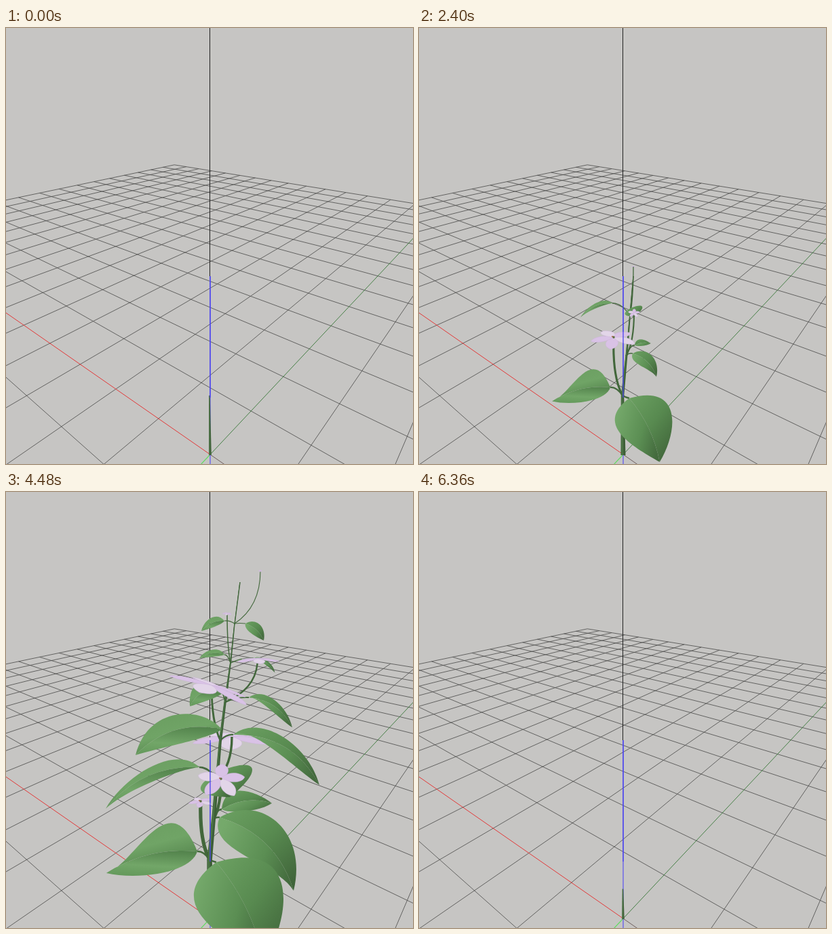
These frames come from a looping animation (600 by 643 pixels, 6440 ms). An HTML page:

```html
<!DOCTYPE html>
<html lang="en">
<head>
<meta charset="utf-8">
<title>Growing plant</title>
<style>
html, body { margin: 0; width: 100%; height: 100%; overflow: hidden; background: #c6c5c3; }
svg { display: block; width: 600px; height: 643px; }
</style>
</head>
<body>
<svg viewBox="0 0 600 643" width="600" height="643">
  <defs>
    <linearGradient id="g0" x1=".1" y1="0" x2=".6" y2="1"><stop offset="0" stop-color="#6a9d60"/><stop offset=".5" stop-color="#70a466"/><stop offset="1" stop-color="#4f7e48"/></linearGradient>
    <linearGradient id="g1" x1=".6" y1="0" x2=".4" y2="1"><stop offset="0" stop-color="#54844d"/><stop offset=".6" stop-color="#72a668"/><stop offset="1" stop-color="#659a5c"/></linearGradient>
    <linearGradient id="g2" x1="0" y1="0" x2=".9" y2="1"><stop offset="0" stop-color="#6ca162"/><stop offset=".5" stop-color="#588a50"/><stop offset="1" stop-color="#3f6339"/></linearGradient>
    <linearGradient id="g3" x1="0" y1=".3" x2="1" y2=".7"><stop offset="0" stop-color="#75a96b"/><stop offset=".6" stop-color="#5b8e53"/><stop offset="1" stop-color="#446b3e"/></linearGradient>
  </defs>
  <g id="floor" fill="none"></g>
  <g id="plant"></g>
  <path d="M301 366V545" stroke="#4a43ee" stroke-width="1.3"/>
</svg>
<script>
const LOOP = 6440, RESET = 6280;
const clamp = (v, a = 0, b = 1) => Math.max(a, Math.min(b, v));
const mix = (a, b, k) => a + (b - a) * k;
const n1 = v => v.toFixed(1);
const pt = p => n1(p[0]) + ' ' + n1(p[1]);

// Ground plane in two-point perspective.
function ground(x, y) {
  const a = x * .1075, b = y * .1333, w = 1 + a + b;
  return [(301 - 485 * a + 813 * b) / w, (629 + 83.5 * (a + b)) / w];
}

function drawFloor() {
  const near = (k, other, own) => Math.max(-15, (-.9 - k * own) / other);
  const line = (p, q, color, w = .8) =>
    `<path d="M${pt(p)}L${pt(q)}" stroke="${color}" stroke-width="${w}"/>`;
  let out = '';
  for (let k = -15; k <= 15; k++) {
    if (!k) continue;
    const x0 = near(k, .1075, .1333), y0 = near(k, .1333, .1075);
    if (x0 < 15) out += line(ground(x0, k), ground(15, k), '#4a4a48');
    if (y0 < 15) out += line(ground(k, y0), ground(k, 15), '#4a4a48');
  }
  const o = ground(0, 0);
  out += line(o, ground(-4, 0), '#5a4444') + line(o, ground(0, -3), '#62dc62', 1.2);
  out += line(o, ground(15, 0), '#e23a3a', 1) + line(o, ground(0, 15), '#387838', .9);
  out += line([300.5, 0], [300.5, 366], '#222', 1) + line([301, 366], [301, 643], '#5a52f0', 1.2);
  document.getElementById('floor').innerHTML = out;
}

// Growth clock: real time minus the pauses.
const PAUSES = [[0, 80], [2000, 2280], [2400, 2520], [4000, 4160], [6160, 6200]];
const clock = t => PAUSES.reduce((s, [a, b]) => s - clamp(t - a, 0, b - a), t);

const KEYS = [840, 2400, 3240, 4480, 5840, 6240].map(clock);
const NODES = [[301, 629], [300, 542], [306, 482], [311, 424], [316, 366], [323, 310],
  [331, 252], [337, 194], [345, 133], [352, 77], [359, 20]];
const BIRTH = [-160, 150, 1000, 1700, 2560, 2950, 3700, 4250, 5100, 5900].map(clock);

// Sizes at the last keys of the timeline, per node.
const LEAF_SIZE = [[], [.31, .64, 1, 1, .98, .98], [.32, 1, 1, 1, 1], [.34, .6, 1, 1, 1],
  [.28, 1, 1, 1], [.38, .66, 1, 1.1], [.5, 1, 1.2], [1, 1, 1.5], [1, 1.1]];
const BLOOM = [[], [3, 34, 78, 18, 0, 0], [9, 82, 36, 18, 12], [2.5, 14, 60, 14, 8],
  [7, 62, 62, 55], [2.5, 32, 62, 62], [7, 18, 30], [2.5, 9, 16], [3, 6]];

// node, base, tip, heights of the upper and lower edge relative to length
const BACK_LEAVES = [
  [8, 328, 131, 300, 153, .4, .4, -.3, -.2],
  [8, 345, 121, 346, 135, 1.8, 1.3, -1.8, -1.3],
  [7, 322, 190, 288, 205, .45, .4, -.1, -.05],
  [7, 353, 194, 380, 219, .45, .5, -.25, -.1],
  [6, 322, 240, 248, 250, .36, .34, -.05, 0],
  [6, 365, 245, 428, 288, .27, .3, .08, .06],
  [5, 318, 297, 247, 326, .4, .9, -.08, -.02],
  [5, 358, 303, 455, 370, .35, .28, .12, 0],
  [4, 335, 358, 462, 432, .32, .3, .18, .02],
  [2, 318, 468, 392, 459, .55, .3, -.1, -.15],
  [3, 312, 413, 330, 450, 1.7, 1.4, -1.5, -.6],
  [4, 318, 350, 191, 388, .3, .5, -.06, 0],
  [3, 285, 406, 147, 467, .3, .22, .05, .1]
];
const FRONT_LEAVES = [
  [1, 282, 530, 148, 562, .82, 0, -.21, -.15],
  [2, 315, 480, 424, 588, .45, .5, -.32, .08],
  [1, 310, 546, 380, 693, .75, .45, -.65, -.2]
];
// young place, mature place, flatness, slope, turn
const FLOWERS = [[],
  [274, 457, 287, 456, .42, 0, 170],
  [317, 415, 317, 423, .7, 0, -15],
  [316, 352, 333, 361, .22, 0, 20],
  [311, 283, 303, 285, .17, .33, 35],
  [368, 243, 371, 246, .13, 0, 10],
  [326, 179, 322, 182, .3, .05, 30],
  [375, 116, 365, 106, .6, 0, 20],
  [312, 70, 312, 67, .6, 0, 50]
];

function valueAt(list, birth, t) {
  let px = birth, py = 0;
  const start = KEYS.length - list.length;
  for (let i = 0; i < list.length; i++) {
    const x = KEYS[start + i];
    if (t <= x) return mix(py, list[i], clamp((t - px) / (x - px)));
    px = x; py = list[i];
  }
  return py;
}

function leaf([node, bx, by, tx, ty, u, u2, l, l2], t) {
  const s = valueAt(LEAF_SIZE[node], BIRTH[node], t);
  if (t <= BIRTH[node] || s < .01) return '';
  const vx = (tx - bx) * s, vy = (ty - by) * s, side = vx > 0 ? 1 : -1;
  const at = (a, h) => pt([bx + vx * a + vy * h * side, by + vy * a - vx * h * side]);
  const rib = at(.5, .375 * (u + u2 + l + l2));
  const half = (a, b, id) =>
    `<path d="M${at(0, 0)}C${at(.12, a)} ${at(.7, b)} ${at(1, 0)}Q${rib} ${at(0, 0)}" fill="url(#g${id})"/>`;
  const g = side > 0 ? 2 : 0;
  return half(u, u2, g) + half(l, l2, g + 1);
}

function place(i, t) {
  const [x, y, mx, my] = FLOWERS[i], k = clamp((t - BIRTH[i] - 700) / 700);
  return [mix(x, mx, k), mix(y, my, k)];
}

function flower(i, t) {
  const R = valueAt(BLOOM[i], BIRTH[i], t);
  if (t < BIRTH[i] + 150 || R < .5) return '';
  const [, , , , flat, slope, turn] = FLOWERS[i], c = place(i, t);
  const at = (r, a) => {
    const x = r * R * Math.cos(a), y = r * R * Math.sin(a);
    return pt([c[0] + x, c[1] + y * flat + x * slope + .16 * R * r * (r - .35)]);
  };
  let out = '';
  for (const j of [4, 3, 0, 2, 1]) {
    const a = (turn + j * 72) * Math.PI / 180;
    out += `<path d="M${pt(c)}C${at(.5, a - .85)} ${at(.9, a - .38)} ${at(1, a)}C${at(.9, a + .38)} ${at(.5, a + .85)} ${pt(c)}" `
      + `fill="${j % 2 ? '#e2d5e8' : '#d9c2e6'}" stroke="#ccb5da" stroke-width=".5"/>`;
  }
  if (R > 15 && flat > .4) {
    out += `<circle cx="${n1(c[0])}" cy="${n1(c[1])}" r="1.7" fill="#5b6b3a"/>`
      + `<circle cx="${n1(c[0] - 2)}" cy="${n1(c[1] - 1)}" r=".9" fill="#a5573a"/>`;
  }
  return out;
}

const girth = (i, t) => i ? clamp(1 + (t - BIRTH[i]) / 580, 1, 8.5) : clamp(3.6 + t / 600, 2.5, 9);

function stem(t) {
  let out = '';
  BIRTH.forEach((b, i) => {
    if (t < b) return;
    const p = NODES[i], q = NODES[i + 1], k = clamp((t - b) / (i ? 230 : 160), .05);
    const e = [mix(p[0], q[0], k), mix(p[1], q[1], k)];
    const w = girth(i, t) / 2, v = i < 9 && t > BIRTH[i + 1] ? girth(i + 1, t) / 2 : .7;
    const band = (a, c, color) => `<path d="M${pt([p[0] + a * w, p[1] + 1])}L${pt([e[0] + a * v, e[1]])}`
      + `L${pt([e[0] + c * v, e[1]])}L${pt([p[0] + c * w, p[1] + 1])}Z" fill="${color}"/>`;
    out += band(-1, 1, '#3d5e37') + band(-.8, .1, '#4b7344');
  });
  return out;
}

function stalk(i, t) {
  const age = t - BIRTH[i];
  if (age <= 0) return '';
  const k = clamp(age / 200), o = NODES[i], c = place(i, t), e = [mix(o[0], c[0], k), mix(o[1], c[1], k)];
  const bend = [e[0] - (i == 1 ? 2 : 0), o[1] - .32 * (o[1] - e[1])];
  return `<path d="M${pt(o)}Q${pt(bend)} ${pt(e)}" fill="none" stroke="#42673b" stroke-width="${n1(clamp(.8 + age / 850, 1, 6))}"/>`;
}

function petiole([node, bx, by], t) {
  const age = t - BIRTH[node], o = NODES[node];
  if (age <= 0) return '';
  return `<path d="M${pt(o)}Q${n1((o[0] + bx) / 2)} ${n1(by - 1)} ${bx} ${by}" fill="none" stroke="#44693d" stroke-width="${n1(clamp(1 + age / 1500, 1, 2.5))}"/>`;
}

const plant = document.getElementById('plant');

function render(ms) {
  let t = Math.floor(ms % LOOP / 40) * 40;
  if (t >= 6360) t = 6360;
  t = t >= RESET ? t - LOOP : clock(t);
  const ids = [8, 7, 6, 5, 4, 3, 2, 1];
  plant.innerHTML = flower(3, t)
    + [...BACK_LEAVES, ...FRONT_LEAVES].map(l => petiole(l, t)).join('')
    + ids.map(i => stalk(i, t)).join('')
    + stem(t)
    + BACK_LEAVES.map(l => leaf(l, t)).join('')
    + ids.filter(i => i != 3).map(i => flower(i, t)).join('')
    + FRONT_LEAVES.map(l => leaf(l, t)).join('');
}

drawFloor();
const begin = performance.now();
function tick() {
  render(performance.now() - begin);
  requestAnimationFrame(tick);
}
render(0);
requestAnimationFrame(tick);
</script>
</body>
</html>
```
